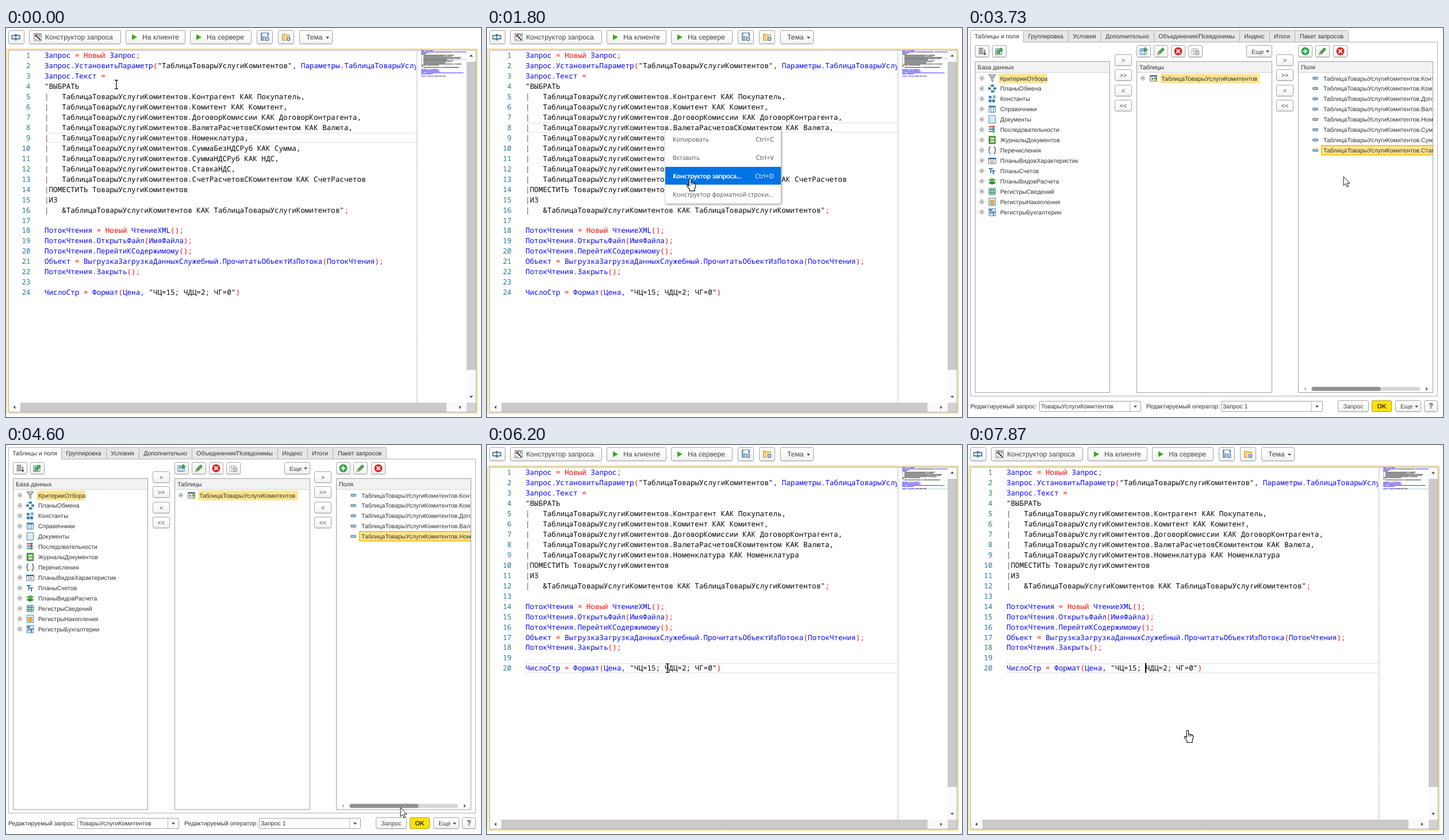
Recreate the animation shown at these times as an HTML page with a canvas. Size 826 by 678 pixels, loop 8 s.

```html
<!DOCTYPE html>
<html lang="ru">
<head>
<meta charset="utf-8">
<style>
html, body { margin: 0; width: 100%; height: 100%; overflow: hidden; background: #fff; }
canvas { display: block; }
</style>
</head>
<body>
<canvas id="stage" width="826" height="678"></canvas>
<script>
const c = document.getElementById('stage').getContext('2d');
c.textRendering = 'geometricPrecision';

const SANS = '"Liberation Sans", Arial, sans-serif';
const MONO = '12.59px "Noto Sans Mono", "DejaVu Sans Mono", monospace';
const BIG = '12.15px ' + SANS, SMALL = '10.5px ' + SANS;
const MENU_FONT = '10.78px "Open Sans", "Noto Sans", sans-serif';
const KEY_FONT = '11.2px "Open Sans", "Noto Sans", sans-serif';
const CHAR = 7.555, ROW = 17.95, STEP = 1000 / 15;
const BLUE = '#3c7fb1', GREY = '#6b7480';

// ---------- helpers ----------
function rect(x, y, w, h, fill, stroke, r = 0) {
  c.beginPath();
  c.roundRect(x + .5, y + .5, w - 1, h - 1, r);
  if (fill) { c.fillStyle = fill; c.fill(); }
  if (stroke) { c.strokeStyle = stroke; c.lineWidth = 1; c.stroke(); }
}
function bar(x, y, w, h, fill) {
  c.fillStyle = fill;
  c.fillRect(x, y, w, h);
}
function text(s, x, y, font = SMALL, color = '#333', align = 'left') {
  c.font = font;
  c.fillStyle = color;
  c.textAlign = align;
  c.fillText(s, x, y);
}
// parts: [path, fill, stroke, line width]
function icon(x, y, ...parts) {
  c.save();
  c.translate(x, y);
  for (const [d, fill, stroke, w = 1] of parts) {
    const p = new Path2D(d);
    if (fill) { c.fillStyle = fill; c.fill(p); }
    if (stroke) { c.strokeStyle = stroke; c.lineWidth = w; c.stroke(p); }
  }
  c.restore();
}
function button(x, y, w, h, label = '', font = SMALL, tx = x + w / 2, align = 'center') {
  const g = c.createLinearGradient(0, y, 0, y + h);
  g.addColorStop(.3, '#fff');
  g.addColorStop(1, '#efefef');
  bar(x + 1, y + h, w - 2, 1, '#e2e2e2');
  rect(x, y, w, h, g, '#a3a3a3', 2);
  text(label, tx, y + h / 2 + 4, font, '#444', align);
}
const tri = (x, y, dx, dy, color = '#444') => icon(x, y, [
  dx ? `M${-dx} -3V3L${dx} 0Z` : `M-3 ${-dy}H3L0 ${dy}Z`, color]);

// ---------- editor ----------
const T = 'ТаблицаТоварыУслугиКомитентов';
const head = ['Запрос = Новый Запрос;',
  `Запрос.УстановитьПараметр("${T}", Параметры.ТаблицаТоварыУслугиКомитентов);`,
  'Запрос.Текст =', '"ВЫБРАТЬ'];
const fields = ['Контрагент КАК Покупатель', 'Комитент КАК Комитент', 'ДоговорКомиссии КАК ДоговорКонтрагента',
  'ВалютаРасчетовСКомитентом КАК Валюта', 'Номенклатура', 'СуммаБезНДСРуб КАК Сумма',
  'СуммаНДСРуб КАК НДС', 'СтавкаНДС', 'СчетРасчетовСКомитентом КАК СчетРасчетов'];
const tail = ['|ПОМЕСТИТЬ ТоварыУслугиКомитентов', '|ИЗ', `|   &${T} КАК ${T}";`, '',
  'ПотокЧтения = Новый ЧтениеXML();', 'ПотокЧтения.ОткрытьФайл(ИмяФайла);',
  'ПотокЧтения.ПерейтиКСодержимому();',
  'Объект = ВыгрузкаЗагрузкаДанныхСлужебный.ПрочитатьОбъектИзПотока(ПотокЧтения);',
  'ПотокЧтения.Закрыть();', '', 'ЧислоСтр = Формат(Цена, "ЧЦ=15; ЧДЦ=2; ЧГ=0")'];

function tokens(line) {
  const re = /^\||(?<=^\|)[^"]+"?|"[^"]*"?|Новый|[=();]|[^\s"=();|]+/g;
  return [...line.matchAll(re)].map(({ 0: s, index }) => {
    const color = /^([=();]|Новый)$/.test(s) ? '#f00' : s === '|' ? '#5c4020'
      : /^["|]/.test(line) || s[0] === '"' ? '#000' : '#00f';
    return { s, index, color };
  });
}
function build(list) {
  const body = list.map((f, i) => `|   ${T}.${f}${i < list.length - 1 ? ',' : ''}`);
  return [...head, ...body, ...tail].map(tokens);
}
const before = build(fields);
const after = build([...fields.slice(0, 4), 'Номенклатура КАК Номенклатура']);

function toolbar() {
  button(4, 4, 28, 24);
  icon(17, 16, ['M-7 -3H7V3H-7Z', '#e4f0fa', '#2a5c8c', 1.3],
    ['M-2 -5H2M0 -5V5M-2 5H2', null, '#2a5c8c', 1.2]);
  button(40, 4, 160, 24, 'Конструктор запроса', BIG, 68, 'left');
  icon(48, 9, ['M.5 .5H13.5V13.5H.5Z', '#f4f6f8', '#8b959e'], ['M1 1H13V4H1Z', '#b7c3cd'],
    ['M4 4L12 12', null, '#333', 2], ['M2 6L6 2', null, '#d33b2c', 2],
    ['M9 3L12 6M2 10L5 12', null, '#3c9d55', 1.5]);
  button(208, 4, 104, 24, 'На клиенте', BIG, 237, 'left');
  button(320, 4, 107, 24, 'На сервере', BIG, 349, 'left');
  for (const x of [219, 331]) icon(x, 11, ['M0 0L9 5L0 10Z', '#3aa81e']);
  button(436, 4, 28, 24);
  button(473, 4, 28, 24);
  icon(443, 8, ['M.5 .5H13.5V13.5H.5Z', '#8fb1cf', '#4d789f'], ['M3 1H11V6H3Z', '#fff']);
  icon(480, 8, ['M.5 2.5H5L7 4H13.5V13.5H.5Z', '#f7d27a', '#c0922f']);
  for (const x of [454, 491])
    icon(x, 19, ['M5 0A5 5 0 1 1 -5 0A5 5 0 1 1 5 0Z', '#fff'],
      ['M-4 0H4M0 -4V4M-3 -3L3 3M3 -3L-3 3', null, '#5d86ab', 1.6],
      ['M2.5 0A2.5 2.5 0 1 1 -2.5 0A2.5 2.5 0 1 1 2.5 0Z', '#fff', '#5d86ab', 1.5]);
  button(510, 4, 58, 24, 'Тема', BIG, 522, 'left');
  tri(559, 17, 0, 1.8);
}

function editor(lines, current, caretCol) {
  toolbar();
  rect(1, 36, 819, 636, '#fffbea', '#f3cc55');
  rect(4, 38, 814, 632, '#fff', '#a0a0a0');
  const y = 48 + (current - 1) * ROW;
  bar(67, y - 9, 647, 1.6, '#ebebeb');
  bar(67, y + 7.2, 647, 1.6, '#ebebeb');

  c.save();
  c.beginPath();
  c.rect(5, 39, 709, 613);
  c.clip();
  lines.forEach((line, i) => {
    const base = 52.3 + i * ROW;
    text(i + 1, 42.5, base, MONO, '#237893', 'right');
    for (const { s, index, color } of line) text(s, 67 + index * CHAR, base, MONO, color);
  });
  c.restore();
  if (caretCol) bar(Math.round(66.5 + caretCol * CHAR), y - 9, 2, 17, '#000');

  // minimap
  const g = c.createLinearGradient(713, 0, 718, 0);
  g.addColorStop(0, '#dedede');
  g.addColorStop(1, '#fff');
  bar(713, 39, 5, 614, g);
  c.save();
  c.beginPath();
  c.rect(722, 38, 79, 100);
  c.clip();
  bar(722, 39 + (current - 1) * 1.92, 79, 2, '#cfe4ee');
  c.globalAlpha = .75;
  lines.forEach((line, i) => {
    for (const { s, index, color } of line)
      for (const w of s.matchAll(/\S+/g))
        bar(722 + (index + w.index) * .95, 39.2 + i * 1.92, w[0].length * .95, 1.1, color);
  });
  c.restore();

  // scrollbars
  bar(801, 39, 16, 614, '#fafafa');
  bar(5, 653, 812, 16, '#fafafa');
  bar(801, 59, 16, 537, '#cacaca');
  bar(25, 653, 741, 16, '#cacaca');
  bar(801, 653, 16, 16, '#d2d2d2');
  tri(809, 48, 0, -1.7);
  tri(809, 643, 0, 1.7);
  tri(14.5, 661, -1.7, 0);
  tri(790, 661, 1.7, 0);
}

const items = [['Копировать', 'Ctrl+C'], ['Вставить', 'Ctrl+V'],
  ['Конструктор запроса...', 'Ctrl+D'], ['Конструктор форматной строки...', '']];
function menu(top, hover) {
  c.save();
  c.shadowColor = 'rgba(0,0,0,.5)';
  c.shadowBlur = 4;
  c.shadowOffsetX = c.shadowOffsetY = 1;
  bar(310, top, 201, 128, '#fff');
  c.restore();
  items.forEach(([label, key], i) => {
    const base = top + 19.5 + i * 32, on = i === hover, color = on ? '#fff' : '#555';
    if (on) {
      bar(310, top + i * 32, 201, 31, '#0074e4');
      text(label, 323.7, base, MENU_FONT, color);
    }
    text(label, 323, base, MENU_FONT, color);
    text(key, 499, base, KEY_FONT, color, 'right');
  });
}

// ---------- query builder ----------
const tabs = [['Таблицы и поля', 4], ['Группировка', 96], ['Условия', 174], ['Дополнительно', 231],
  ['Объединения/Псевдонимы', 323], ['Индекс', 472], ['Итоги', 524], ['Пакет запросов', 568], ['', 662]];
const page = ['M1.5 .5H12.5V13.5H1.5Z', '#eaf3fb', BLUE];
const arrow = (y, color) => [`M1 ${y}H8V${y - 1.5}L13 ${y + 1}L8 ${y + 3.5}V${y + 2}H1Z`, color];
const letters = ['M1 3H8M4.5 3V11M6 7H12M9 7V13', null, '#2f6ca3', 1.8];
const tree = [
  ['КритерииОтбора', ['M1 1H13L8.5 7V13L5.5 11V7Z', '#d9dde0', GREY], ['M4 2L7 7M10 2L7 7', null, GREY]],
  ['ПланыОбмена', ['M5 0H10V4H5ZM0 5H5V9H0ZM9 5H14V9H9ZM5 10H10V14H5Z', BLUE], ['M2 3L4 1M12 11L10 13', null, '#333']],
  ['Константы', ['M1 2H6V6H1ZM1 8H6V13H1ZM7 8H12V13H7Z', BLUE], ['M8 1H13V6H8Z', '#79add2']],
  ['Справочники', ['M1.5 2.5H12.5V12.5H1.5ZM5 2V13M9 2V13', '#f3f8fc', BLUE], ['M1 1H13V4H1Z', BLUE]],
  ['Документы', page, ['M4 5H10M4 8H10M4 11H10', null, '#b4d0e6']],
  ['Последовательности', arrow(1, '#d5402b'), arrow(5, '#2d78b5'), arrow(9, '#35a14b')],
  ['ЖурналыДокументов', ['M1.5 .5H12.5V13.5H1.5Z', '#58a646', '#39762c'], ['M4 3H11V6H4ZM4 8H11V11H4Z', '#d6efcf']],
  ['Перечисления', ['M4 1Q2 1 2 4Q2 7 .5 7Q2 7 2 10Q2 13 4 13M10 1Q12 1 12 4Q12 7 13.5 7Q12 7 12 10Q12 13 10 13', null, '#444', 1.2],
    ['M5 10H6V11H5ZM8 10H9V11H8Z', '#444']],
  ['ПланыВидовХарактеристик', ['M.5 2.5H13.5V12.5H.5Z', '#fff', GREY], ['M1 2H13V5H1Z', BLUE], ['M3 7.5H11M3 10H11', null, GREY]],
  ['ПланыСчетов', letters],
  ['ПланыВидовРасчета', ['M0 10L7 6.5L14 10L7 13Z', '#2f8639'], ['M0 5L7 1.5L14 5L7 9Z', '#5bb24b']],
  ['РегистрыСведений', ['M1.5 1.5H12.5V12.5H1.5Z', '#d8ebdc', BLUE], ['M1 5H13M1 9H13M5 1V13M9 1V13', null, '#4a9072', 1.5]],
  ['РегистрыНакопления', page, ['M4 5Q7 3 10 5V11Q7 13 4 11Z', '#eeb52a', '#bb8420']],
  ['РегистрыБухгалтерии', page, letters]];

const pencil = [['M1 13L2 9L10 1L13 4L5 12Z', '#52ad4d', '#39712f'], ['M1 13L2 9L5 12Z', '#e4bd7c']];
const disc = color => ['M14 7A7 7 0 1 1 0 7A7 7 0 1 1 14 7Z', color];
const cross = [disc('#d92b2b'), ['M4 4L10 10M10 4L4 10', null, '#fff', 2]];
const plus = [disc('#2fa546'), ['M7 3V11M3 7H11', null, '#fff', 2]];
const grid = color => ['M.5 2.5H11.5V12.5H.5ZM0 6H12M4 2V13M8 2V13', '#f3f8fc', color];
const tools = [
  [12, ['M1 2H9M1 5H9M1 8H9M1 11H9', null, '#555', 1.3], ['M11.5 4V12M9.5 10L11.5 13L13.5 10', null, '#333', 1.2]],
  [42, grid(BLUE), ...pencil],
  [293, grid(BLUE), ['M10 0V8M6 4H14', null, '#2fa546', 2.5]],
  [323, ...pencil], [353, ...cross],
  [383, grid('#b5b5b5'), ['M13 10A3 3 0 1 1 7 10A3 3 0 1 1 13 10Z', '#ddd', '#aaa', 2]],
  [574, ...plus], [604, ...pencil], [635, ...cross]];

function selection(x, y, w, focused) {
  rect(x, y - 9, w, 18, '#ffe591', focused ? '#f8b800' : null);
  if (focused) rect(x + 1, y - 8, w - 2, 16, null, '#fbc93a');
}
function expander(x, y) {
  icon(x, y, ['M3.5 0A3.5 3.5 0 1 1 -3.5 0A3.5 3.5 0 1 1 3.5 0Z', '#fff', '#999'],
    ['M-2 0H2M0 -2V2', null, '#666']);
}
function panel(x, w, title) {
  rect(x, 58, w, 578, '#fff', '#a0a0a0');
  bar(x + 1, 59, w - 2, 18, '#f2f2f2');
  bar(x + 1, 77, w - 2, 1, '#d4d4d4');
  text(title, x + 5, 72);
}
function combo(x, value) {
  rect(x, 650, 177, 19, '#fff', '#a0a0a0', 1);
  bar(x + 157, 651, 1, 17, '#b5b5b5');
  text(value, x + 3, 663);
  tri(x + 167, 660, 0, 1.7);
}

function builder(count, picked, pressed) {
  rect(4, 24, 813, 618, '#fff', '#b0b0b0');
  tabs.slice(0, -1).forEach(([label, x], i) => {
    const w = tabs[i + 1][1] - x;
    rect(x, 4, w + (i < 7), 21, i ? '#e6e6e6' : '#fff', '#b0b0b0', 1);
    if (!i) bar(5, 23, w - 1, 3, '#fff');
    text(label, x + w / 2, 18, SMALL, '#333', 'center');
  });
  for (const [x, ...parts] of tools) {
    button(x, 30, 25, 21);
    icon(x + 5.5, 33.5, ...parts);
  }
  button(484, 30, 45, 21, 'Еще', SMALL, 493, 'left');
  tri(521, 41, 0, 1.7);
  for (const x of [255, 536])
    ['>', '>>', '<', '<<'].forEach((s, i) => button(x, 46 + Math.round(i * 26.4), 30, 20, s));

  panel(12, 235, 'База данных');
  selection(53, 88, 85, !picked);
  tree.forEach(([label, ...parts], i) => {
    const y = 87.5 + i * ROW;
    expander(24, y);
    icon(35, y - 7, ...parts);
    text(label, 56, y + 4);
  });

  panel(293, 236, 'Таблицы');
  selection(334, 88, 174, false);
  expander(304, 87.5);
  icon(316, 81, ['M.5 1.5H12.5V11.5H.5Z', '#eef3f6', GREY], ['M1 1H12V4H1Z', GREY],
    ['M3 6H6V9H3Z', BLUE], ['M8 5H13V9H8Z', '#59a944'], ['M9 10H13V13H9Z', '#e0ae35']);
  text(T, 336, 91.5);

  panel(574, 235, 'Поля');
  c.save();
  c.beginPath();
  c.rect(575, 78, 233, 540);
  c.clip();
  const sel = picked ? count - 1 : 0;
  selection(614, Math.round(87.5 + sel * ROW), 220, picked);
  fields.slice(0, count).forEach((f, i) => {
    const y = 87.5 + i * ROW;
    rect(599, y - 2.5, 10, 5, '#9cbcd4', '#5b7f9c', 1);
    text(`${T}.${f.split(' ')[0]}`, 618, y + 4);
  });
  c.restore();
  rect(597, 625, 190, 8, '#d6d6d6', null, 4);
  rect(597, 625, 121, 8, '#909090', null, 4);
  tri(586, 629, -1.6, 0, '#aaa');
  tri(798, 629, 1.6, 0);

  text('Редактируемый запрос:', 4, 663);
  combo(124, 'ТоварыУслугиКомитентов');
  text('Редактируемый оператор:', 310, 663);
  combo(440, 'Запрос 1');
  button(643, 649, 54, 20, 'Запрос');
  rect(702, 649, 35, 20, pressed ? '#e8c800' : '#ffe20a', '#b79a00', 2);
  text('OK', 719.5, 663, 'bold 11px ' + SANS, '#333', 'center');
  button(743, 649, 45, 20, 'Еще', SMALL, 752, 'left');
  tri(780, 660, 0, 1.7);
  button(793, 649, 24, 20, '?', 'bold 13px ' + SANS);
}

// ---------- pointer ----------
const path = [[67, 192, 98.5], [333, 313, 178], [1067, 313, 178], [1867, 354, 264], [2000, 354, 270],
  [2200, 354, 270], [2667, 516, 283], [2933, 516, 281], [3067, 516, 281], [3533, 655, 236], [3667, 655, 236],
  [3733, 653, 259], [4133, 653, 259], [4467, 692, 661], [4600, 686, 632], [4667, 686, 632],
  [4933, 718, 658], [5067, 718, 658], [5267, 442, 457], [5533, 314, 389], [6400, 314, 389],
  [6733, 316, 395], [7067, 316, 395], [7133, 315, 396], [7533, 382, 497], [8000, 382, 497]];
function pointerAt(t) {
  const i = path.findIndex(p => p[0] >= t);
  if (i < 1) return path[0].slice(1);
  const [t0, x0, y0] = path[i - 1], [t1, x1, y1] = path[i];
  const u = (t - t0) / (t1 - t0), e = u * u * (3 - 2 * u);
  return [x0 + (x1 - x0) * e, y0 + (y1 - y0) * e];
}
const pointers = {
  beam: [['M-3 -7.5H-1L0 -6.5L1 -7.5H3M0 -6.5V6.5M-3 7.5H-1L0 6.5L1 7.5H3', null, '#111', 1.3]],
  arrow: [['M0 0V15.5L3.7 12.2L6.2 18L8.6 17L6.1 11.4H11Z', '#fff', '#111']],
  hand: [['M-1.8 1.5Q0 -.6 1.6 1.5V7L4 7.2L6.5 8L9 9Q10 10 9.6 13L8 18V21.5H-1V19L-5.5 13Q-6.5 10.3 -4 11L-1.8 13Z', '#fff', '#111', 1.2],
    ['M1.6 7V11M4.5 7.5V11M7 8.5V11', null, '#111']]
};
function spinner(x, y, t) {
  const ring = (a, b, color) => {
    c.beginPath();
    c.arc(x, y, 7.2, a, b);
    c.lineWidth = 4.8;
    c.strokeStyle = color;
    c.stroke();
  };
  const a = t / 150;
  ring(0, 7, '#1f8ceb');
  ring(a, a + 1.2, '#58aef5');
}

// ---------- scene ----------
const within = (t, a, b) => t >= a - 5 && t < b - 5;
function draw(t) {
  const is = (a, b) => within(t, a, b);
  const [x, y] = pointerAt(t);
  bar(0, 0, 826, 678, '#fff');
  if (is(2933, 5067)) {
    const gone = [3733, 3867, 4000, 4133].filter(d => t >= d - 5).length;
    builder(9 - gone, t >= 3528, is(4867, 5067));
  } else if (t < 2928) {
    const caret = is(467, 933) || is(2200, 2933);
    editor(before, t < 462 ? 9 : 8, caret && 32);
  } else {
    const moved = t >= 5728;
    const caret = moved ? is(5733, 6200) || t >= 7795 : is(5067, 5533);
    editor(after, moved ? 20 : 12, caret && (moved ? 32 : 69));
  }
  const hand = is(1200, 2333) || t >= 6528;
  const top = is(1067, 2200) ? 178 : is(6400, 7800) ? 389 : 0;
  if (top) menu(top, hand ? Math.floor((y - top) / 32) : -1);
  if (is(2333, 2933)) spinner(x, y, t);
  else icon(x, y, ...pointers[hand ? 'hand' : is(2933, 5133) ? 'arrow' : 'beam']);
}

let last = -1;
function tick() {
  const step = Math.floor((performance.now() % 8000 + 4) / STEP);
  if (step !== last) draw((last = step) * STEP % 8000);
  requestAnimationFrame(tick);
}
tick();
</script>
</body>
</html>
```
